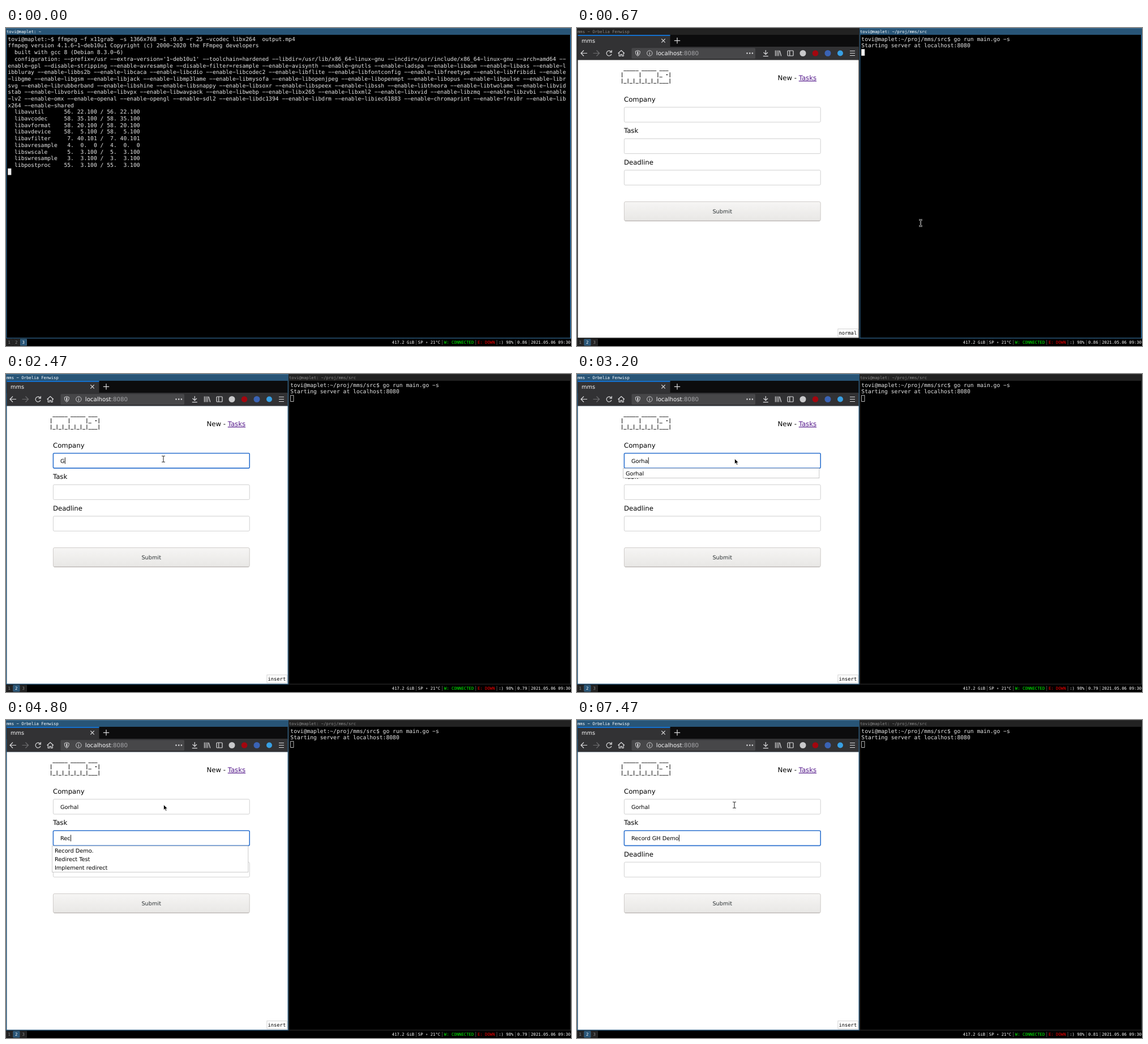
Recreate the animation shown at these times as an HTML page. Size 998 by 561 pixels, loop 8000 ms.

```html
<!DOCTYPE html>
<html lang="en">
<head>
<meta charset="utf-8">
<title>Desktop session</title>
<style>
  html, body { margin: 0; width: 100%; height: 100%; overflow: hidden; background: #000; }
  svg { display: block; width: 998px; height: 561px; }
  text { white-space: pre; text-rendering: geometricPrecision; font: 9.74px "DejaVu Sans", sans-serif; }
  .term { font: 9.709px "DejaVu Sans Mono", monospace; fill: #e8e8e8; }
  .small { font: 7.28px "DejaVu Sans Mono", monospace; fill: #fff; }
  .code { font: 8.77px "DejaVu Sans Mono", monospace; }
  .label { font-size: 11.69px; }
  .tag, .banner { font-weight: bold; }
  .frame { fill: #222; }
  .edge { fill: #333; }
  .side { fill: #292d2e; }
  .title { fill: #888; }
  .focus > .frame { fill: #285577; }
  .focus > .edge { fill: #4c7899; }
  .focus > .side { fill: #2e78b4; }
  .focus > .title { fill: #fff; }
  .cursor { fill: none; stroke: #e8e8e8; stroke-width: .8; }
  .focus > .cursor { fill: #f2f2f2; }
  .field rect { fill: #fff; stroke: #c4c4c4; stroke-width: .8; }
  .field.active rect { stroke: #2f73cf; stroke-width: 1.6; }
  .space rect { fill: #222; stroke: #333; stroke-width: .75; }
  .space text { fill: #888; }
  .space.active rect { fill: #285577; stroke: #4c7899; }
  .space.active text { fill: #fff; }
  .icons { fill: none; stroke: #dcdcde; stroke-width: 1.2; }
</style>
</head>
<body>
<svg id="stage" viewBox="0 0 998 561" xmlns="http://www.w3.org/2000/svg">
  <rect width="998" height="561"/>
  <g id="capture"></g>
  <g id="desk">
    <g id="browser">
      <rect class="frame" width="499" height="547.9"/>
      <rect class="edge" width="499" height=".8"/>
      <text class="small title" x="1" y="8.8">mms − Orbelia Fenwisp</text>
      <rect x="1.5" y="12" width="496" height="22" fill="#0c0c0d"/>
      <rect x="1.5" y="12" width="163" height="22" fill="#323234"/>
      <rect x="1.5" y="12.3" width="163" height="1.5" fill="#0a84ff"/>
      <text x="8" y="25.6" fill="#f9f9fa">mms</text>
      <rect x="1.5" y="33" width="496" height="23.5" fill="#323234"/>
      <rect x="96.5" y="35.3" width="218.5" height="18.6" rx="1.6" fill="#474749"/>
      <text x="139.8" y="48" style="font-size:10.2px" fill="#f9f9fa">localhost<tspan fill="#a8a8ab">:8080</tspan></text>
      <g class="icons">
        <path d="M149.3 19.2l6.4 6.4m0-6.4l-6.4 6.4M171.8 22.3h10.4m-5.2-5.2v10.4"/>
        <path d="M18 44.5H7m5-5l-5 5 5 5"/>
        <path d="M28.5 44.5h11m-5-5l5 5-5 5" stroke="#6e6e70"/>
        <path d="M60.3 42a4.5 4.5 0 1 0 .6 4M61.3 39v3.8h-3.8"/>
        <path d="M72.5 44.8l5.7-5.3 5.7 5.3M74.3 44v5.5h2.6v-3h2.6v3h2.6V44"/>
        <path d="M107.3 39.8l4 1.3c0 4-1 6.7-4 8.3-3-1.6-4-4.3-4-8.3z" stroke-width="1"/>
        <path d="M107.3 41.5v6" stroke-width="2"/>
        <circle cx="128.3" cy="44.5" r="4.7" stroke-width=".9"/>
        <path d="M128.3 43.7v3.5m0-5.5v1" stroke-width="1.1"/>
        <path d="M300.5 44.5h0m4.7 0h0m4.7 0h0" stroke-width="2.6" stroke-linecap="round"/>
        <path d="M333.3 39v7.5m-3.7-3.5l3.7 3.7 3.7-3.7M328.8 49.7h9"/>
        <path d="M350.5 39.5v10m2.9-10v10m2.9-10v10m1.7-9.5l2.7 9.5"/>
        <rect x="372" y="40" width="10" height="9" rx="1"/>
        <path d="M375.7 40v9M482 40.5h9m-9 4h9m-9 4h9"/>
      </g>
      <circle cx="399" cy="44.5" r="5.5" fill="#c9c9cb"/>
      <circle cx="421" cy="44.5" r="5.3" fill="#a3060f"/>
      <circle cx="443" cy="44.5" r="5.5" fill="#3a63b5"/>
      <circle cx="465" cy="44.5" r="5" fill="#38a0e4"/>

      <rect x="1.5" y="56.5" width="496" height="489.9" fill="#fff"/>
      <text class="code banner" x="77" y="74.3"> _____ _____ ___ </text>
      <text class="code banner" x="77" y="85.3">|     |     |_ -|</text>
      <text class="code banner" x="77" y="96.2">|_|_|_|_|_|_|___|</text>
      <text class="label" x="354.6" y="92">New - <tspan fill="#551a8b" text-decoration="underline">Tasks</tspan></text>
      <g id="form"></g>
      <linearGradient id="shade" x2="0" y2="1">
        <stop stop-color="#f6f5f4"/><stop offset="1" stop-color="#e8e7e5"/>
      </linearGradient>
      <rect x="83.4" y="306.4" width="346.8" height="34" rx="2.5" fill="url(#shade)" stroke="#c5c1bd" stroke-width=".8"/>
      <path d="M85 340.3h343.6" stroke="#aaa6a2" stroke-width=".8"/>
      <text x="256.7" y="326.5" text-anchor="middle" fill="#2e3436">Submit</text>
      <rect x="460.9" y="530.9" width="35.4" height="14" fill="#fff" stroke="#c8c8c8" stroke-width=".8"/>
      <text class="code" id="mode" x="462.5" y="540.8"></text>
      <rect id="caret" width=".9" height="11.5"/>
      <g id="popup"></g>
    </g>
    <g id="server"></g>
    <g id="pointer">
      <g id="beam" fill="none">
        <path d="M-3-5.3h2.2L0-4.5.8-5.3H3M0-4.5v9M-3 5.3h2.2L0 4.5l.8.8H3" stroke="#fff" stroke-width="2.2"/>
        <path id="beamCore" d="M-3-5.3h2.2L0-4.5.8-5.3H3M0-4.5v9M-3 5.3h2.2L0 4.5l.8.8H3" stroke-width="1.1"/>
      </g>
      <path id="arrow" d="M.5-.5v9.3l2.2-2 1.5 3.5 1.6-.7-1.5-3.3h3z" stroke="#fff" stroke-width=".7"/>
    </g>
  </g>
  <g id="bar"></g>
</svg>
<script>
const $ = id => document.getElementById(id);
const CELL = 5.845, ROW = 11.69, SMALL = 4.383;
const HOME = 'tovi@maplet', LOOP = 8000;

function add(parent, tag, attrs = {}, text) {
  const el = document.createElementNS('http://www.w3.org/2000/svg', tag);
  for (const key in attrs) el.setAttribute(key, attrs[key]);
  if (text !== undefined) el.textContent = text;
  return parent.appendChild(el);
}
const show = (el, on) => el.style.display = on ? '' : 'none';
const last = (list, t) => list.filter(item => item[0] <= t).pop();

// Terminal windows
const TAGS = { x11grab: '#b000b0', swscaler: '#6464ff', libx264: '#00f0f0' };
// The terminal font's hyphen fills its cell, like a minus sign.
const wideHyphens = line => line.replace(/-/g, '−');

function terminal(group, x, width, title, lines) {
  add(group, 'rect', { class: 'frame', x, width, height: 547.9 });
  add(group, 'rect', { class: 'edge', x, width, height: .8 });
  add(group, 'rect', { class: 'side', x: x + width - 1.5, y: 12, width: 1.5, height: 535.9 });
  add(group, 'rect', { x: x + 1.5, y: 12, width: width - 3, height: 534.4 });
  add(group, 'text', { class: 'small title', x: x + 1, y: 8.8 }, title);
  const rows = lines.map(wideHyphens).map((line, i) => {
    const row = add(group, 'text', { class: 'term', x: x + 3.3, y: 22.8 + i * ROW });
    const tag = line.match(/^\[(\w+) @ \w+\]/);
    if (!tag) { row.textContent = line; return row; }
    const name = tag[1], warn = name !== 'libx264';
    add(row, 'tspan', { class: name === 'x11grab' ? '' : 'tag', fill: TAGS[name] }, tag[0]);
    add(row, 'tspan', warn ? { fill: '#b4b800' } : {}, line.slice(tag[0].length));
    return row;
  });
  const cursor = add(group, 'rect', { class: 'cursor', x: x + 3.7, width: CELL - .6, height: ROW - .8 });
  const placeCursor = row => cursor.setAttribute('y', 14.3 + row * ROW);
  placeCursor(lines.length);
  return { rows, placeCursor };
}

const capture = terminal($('capture'), 0, 998, HOME + ': ~', `${HOME}:~$ ffmpeg -f x11grab  -s 1366x768 -i :0.0 -r 25 -vcodec libx264  output.mp4
ffmpeg version 4.1.6-1~deb10u1 Copyright (c) 2000-2020 the FFmpeg developers
  built with gcc 8 (Debian 8.3.0-6)
  configuration: --prefix=/usr --extra-version='1~deb10u1' --toolchain=hardened --libdir=/usr/lib/x86_64-linux-gnu --incdir=/usr/include/x86_64-linux-gnu --arch=amd64 --
enable-gpl --disable-stripping --enable-avresample --disable-filter=resample --enable-avisynth --enable-gnutls --enable-ladspa --enable-libaom --enable-libass --enable-l
ibbluray --enable-libbs2b --enable-libcaca --enable-libcdio --enable-libcodec2 --enable-libflite --enable-libfontconfig --enable-libfreetype --enable-libfribidi --enable
-libgme --enable-libgsm --enable-libjack --enable-libmp3lame --enable-libmysofa --enable-libopenjpeg --enable-libopenmpt --enable-libopus --enable-libpulse --enable-libr
svg --enable-librubberband --enable-libshine --enable-libsnappy --enable-libsoxr --enable-libspeex --enable-libssh --enable-libtheora --enable-libtwolame --enable-libvid
stab --enable-libvorbis --enable-libvpx --enable-libwavpack --enable-libwebp --enable-libx265 --enable-libxml2 --enable-libxvid --enable-libzmq --enable-libzvbi --enable
-lv2 --enable-omx --enable-openal --enable-opengl --enable-sdl2 --enable-libdc1394 --enable-libdrm --enable-libiec61883 --enable-chromaprint --enable-frei0r --enable-lib
x264 --enable-shared
  libavutil      56. 22.100 / 56. 22.100
  libavcodec     58. 35.100 / 58. 35.100
  libavformat    58. 20.100 / 58. 20.100
  libavdevice    58.  5.100 / 58.  5.100
  libavfilter     7. 40.101 /  7. 40.101
  libavresample   4.  0.  0 /  4.  0.  0
  libswscale      5.  3.100 /  5.  3.100
  libswresample   3.  3.100 /  3.  3.100
  libpostproc    55.  3.100 / 55.  3.100
[x11grab @ 0x56366ff4b880] Stream #0: not enough frames to estimate rate; consider increasing probesize
Input #0, x11grab, from ':0.0':
  Duration: N/A, start: 1620304223.554576, bitrate: N/A
    Stream #0:0: Video: rawvideo (BGR[0] / 0x524742), bgr0, 1366x768, 29.97 fps, 1000k tbr, 1000k tbn, 1000k tbc
Stream mapping:
  Stream #0:0 -> #0:0 (rawvideo (native) -> h264 (libx264))
Press [q] to stop, [?] for help
[swscaler @ 0x56366ff60480] Warning: data is not aligned! This can lead to a speed loss
[libx264 @ 0x56366ff564c0] using cpu capabilities: MMX2 SSE2Fast SSSE3 SSE4.2 AVX FMA3 BMI2 AVX2
[libx264 @ 0x56366ff564c0] profile High 4:4:4 Predictive, level 3.2, 4:4:4 8-bit
[libx264 @ 0x56366ff564c0] 264 - core 155 r2917 0a84d98 - H.264/MPEG-4 AVC codec - Copyleft 2003-2018 - http://www.videolan.org/x264.html - options: cabac=1 ref=3 debloc
k=1:0:0 analyse=0x1:0x111 me=hex subme=7 psy=1 psy_rd=1.00:0.00 mixed_ref=1 me_range=16 chroma_me=1 trellis=1 8x8dct=0 cqm=0 deadzone=21,11 fast_pskip=1 chroma_qp_offset
=4 threads=6 lookahead_threads=1 sliced_threads=0 nr=0 decimate=1 interlaced=0 bluray_compat=0 constrained_intra=0 bframes=3 b_pyramid=2 b_adapt=1 b_bias=0 direct=1 weig
htb=1 open_gop=0 weightp=2 keyint=250 keyint_min=25 scenecut=40 intra_refresh=0 rc_lookahead=40 rc=crf mbtree=1 crf=23.0 qcomp=0.60 qpmin=0 qpmax=69 qpstep=4 ip_ratio=1.
40 aq=1:1.00
Output #0, mp4, to 'output.mp4':
  Metadata:
    encoder         : Lavf58.20.100
    Stream #0:0: Video: h264 (libx264) (avc1 / 0x31637661), yuv444p, 1366x768, q=-1--1, 25 fps, 12800 tbn, 25 tbc
    Metadata:
      encoder         : Lavc58.35.100 libx264
    Side data:
      cpb: bitrate max/min/avg: 0/0/0 buffer size: 0 vbv_delay: -1`.split('\n'));
$('capture').classList.add('focus');

terminal($('server'), 499, 499, HOME + ': ~/proj/mms/src', [
  HOME + ':~/proj/mms/src$ go run main.go -s', 'Starting server at localhost:8080'
]);

// Form
const fields = ['Company', 'Task', 'Deadline'].map((name, i) => {
  const top = 139.8 + i * 55.5;
  add($('form'), 'text', { class: 'label', x: 83, y: top - 10.3 }, name);
  const group = add($('form'), 'g', { class: 'field' });
  add(group, 'rect', { x: 83.4, y: top, width: 346.8, height: 26.3, rx: 2 });
  return { top, group, text: add(group, 'text', { x: 96, y: top + 16.9 }) };
});

// Status bar
const spaces = [1, 2, 3].map(n => {
  const x = (n - 1) * 12.45, group = add($('bar'), 'g', { class: 'space' });
  add(group, 'rect', { x: x + .4, y: 549, width: 11.2, height: 11 });
  add(group, 'text', { class: 'small', x: x + 3.5, y: 557.3 }, n);
  return group;
});
let barX = 681.8;
const status = ['417.2 GiB', 'SP ∘ 21°C', 'W: CONNECTED', 'E: DOWN', ':) 98%', '0.86', '2021.05.06 09:30'].map((part, i) => {
  if (i) add($('bar'), 'rect', { x: barX - 3.6, y: 550, width: .75, height: 9, fill: '#666' });
  const fill = { 2: '#0f0', 3: '#f00' }[i] || '#fff';
  const item = add($('bar'), 'text', { class: 'small', x: barX, y: 557.3, style: 'fill:' + fill }, part);
  barX += part.length * SMALL + 6.57;
  return item;
});

// Timeline
const OUTPUT = [[0, 20], [70, 27], [130, 28], [200, 30], [270, 35], [330, 43]];
const MOUSE = [
  [0, 607, 344], [930, 560, 335], [1000, 485, 323], [1070, 400, 311], [1130, 330, 299], [1200, 284, 290],
  [1470, 281, 215], [1530, 276, 179], [1670, 277, 170], [1730, 278, 160], [1800, 278, 153], [1870, 278, 150]
];
const LOAD = [[0, '0.86'], [1800, '0.79'], [6730, '0.81']];
const KEYS = [
  ['Gorhal', [2470, 2670, 2730, 2930, 3130, 3530]],
  ['Record GH Demo', [4400, 4600, 4800, 4930, 5000, 5200, 5330, 6000, 6270, 6330, 7070, 7270, 7330, 7470]]
];
const TASKS = ['Record Demo.', 'Redirect Test', 'Implement redirect', 'Server upgrade'];
const POPUP = [
  [0, []], [2600, ['Gorhal']], [3730, []],
  [4530, TASKS], [4670, TASKS.slice(0, 3)], [4870, TASKS.slice(0, 1)], [6070, []]
];

let openItems;
function drawPopup(items, top) {
  if (items === openItems) return;
  openItems = items;
  $('popup').replaceChildren();
  if (!items.length) return;
  add($('popup'), 'rect', {
    x: 81.4, y: top, width: 346.4, height: 2.4 + items.length * 14.6, fill: '#fff', stroke: '#bcbcbc', 'stroke-width': .8
  });
  items.forEach((item, i) => add($('popup'), 'text', { x: 86, y: top + 12.2 + i * 14.6 }, item));
}

function drawDesk(t) {
  const [, x, y] = last(MOUSE, t);
  const onTerminal = x > 499;
  $('server').classList.toggle('focus', onTerminal);
  $('browser').classList.toggle('focus', !onTerminal);

  const active = t < 2070 ? -1 : t < 3730 ? 0 : 1;
  fields.forEach((field, i) => field.group.classList.toggle('active', i === active));
  KEYS.forEach(([word, times], i) => {
    fields[i].text.textContent = word.slice(0, times.filter(k => k <= t).length);
  });
  show($('caret'), active >= 0);
  if (active >= 0) {
    const { text, top } = fields[active];
    $('caret').setAttribute('x', 96.3 + (text.textContent ? text.getComputedTextLength() : 0));
    $('caret').setAttribute('y', top + 7.3);
  }
  $('mode').textContent = t < 2270 ? 'normal' : 'insert';

  const items = last(POPUP, t)[1];
  drawPopup(items, fields[Math.max(active, 0)].top + 26.8);

  const overField = x > 83 && x < 430 && fields.some(f => y > f.top && y < f.top + 26);
  const textual = onTerminal || (overField && !items.length);
  show($('beam'), textual);
  show($('arrow'), !textual);
  $('beamCore').setAttribute('stroke', onTerminal ? '#000' : '#333');
  $('pointer').setAttribute('transform', `translate(${x} ${y})`);
}

function draw() {
  const t = performance.now() % LOOP, recording = t < 670;
  show($('capture'), recording);
  show($('desk'), !recording);
  spaces.forEach((space, i) => space.classList.toggle('active', i === (recording ? 2 : 1)));
  status[5].textContent = last(LOAD, t)[1];
  if (recording) {
    const count = last(OUTPUT, t)[1];
    capture.rows.forEach((row, i) => show(row, i < count));
    capture.placeCursor(count);
  } else drawDesk(t);
  requestAnimationFrame(draw);
}
draw();
</script>
</body>
</html>
```
